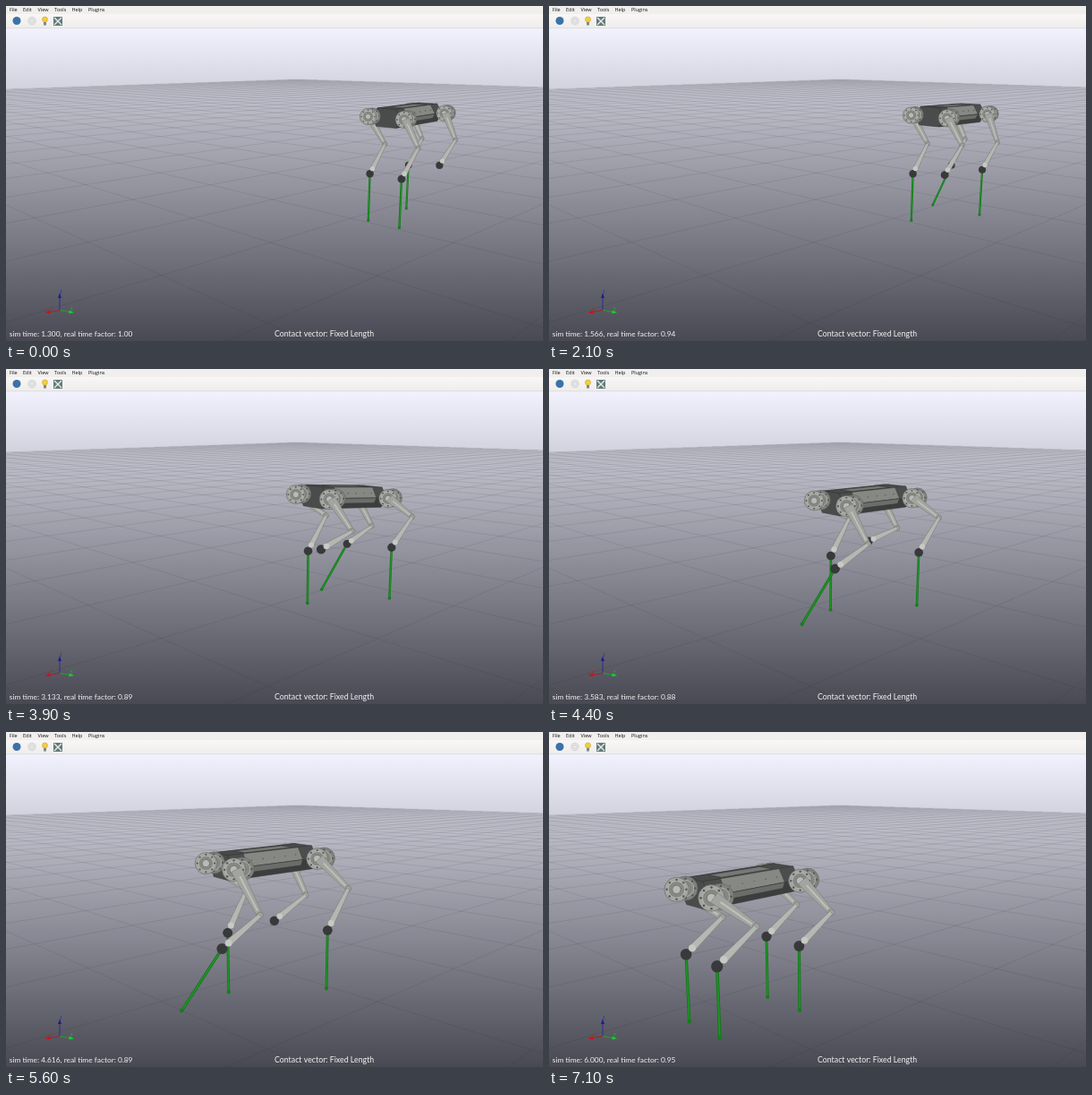
These frames come from a looping animation (600x374 px, 7600 ms). An HTML page with a canvas:

```html
<!DOCTYPE html>
<html lang="en">
<head>
<meta charset="utf-8">
<title>Walking robot viewer</title>
<style>
html, body { margin: 0; height: 100%; overflow: hidden; background: #4d4d59; }
canvas { display: block; }
</style>
</head>
<body>
<canvas id="view" width="600" height="374"></canvas>
<script>
const ctx = document.getElementById('view').getContext('2d');

// Clock: picture step -> simulation ticks (60 per second)
const clock = [[1, 17], [16, 94], [26, 145], [34, 188], [44, 241], [57, 307], [66, 360]];

// Each leg leaves the ground in its own quarter of the gait cycle
const legs = [
  { along: -1, side: 1, beat: 0 },
  { along: 1, side: -1, beat: 1 },
  { along: -1, side: -1, beat: 2 },
  { along: 1, side: 1, beat: 3 }
];
const [hindNear, frontFar, hindFar, frontNear] = legs;
const thigh = .25, shank = .23;

const lerp = (a, b, f) => a + (b - a) * f;
const clamp = (x, lo, hi) => Math.max(lo, Math.min(hi, x));
const mix = (a, b, f) => a.map((v, n) => lerp(v, b[n], f));
const add = (a, b, k = 1) => a.map((v, n) => v + b[n] * k);
const dot = (a, b) => a.reduce((sum, v, n) => sum + v * b[n], 0);
const unit = a => a.map(v => v / Math.hypot(...a));
const bump = (t, mid, width) => Math.exp(-(((t - mid) / width) ** 2));
function ramp(t, from, to) {
  const x = clamp((t - from) / (to - from), 0, 1);
  return x * x * (3 - 2 * x);
}

// Camera: points are [right, ahead, up] in metres
const depth = ([, d, h]) => d * .977 + (.692 - h) * .2095;
function screen(p) {
  const z = depth(p);
  return [300 + 651 * p[0] / z, 199.5 + 651 * ((.692 - p[2]) * .977 - p[1] * .2095) / z];
}
const scaleAt = p => 651 / depth(p);

function line(a, b, color, width) {
  ctx.strokeStyle = color;
  ctx.lineWidth = width;
  ctx.beginPath();
  ctx.moveTo(...a);
  ctx.lineTo(...b);
  ctx.stroke();
}

function poly(points, fill, stroke) {
  ctx.beginPath();
  points.forEach(p => ctx.lineTo(...p));
  ctx.closePath();
  ctx.fillStyle = fill;
  ctx.fill();
  if (stroke) {
    ctx.strokeStyle = stroke;
    ctx.lineWidth = .5;
    ctx.stroke();
  }
}

function disc(p, r, fill, stroke) {
  ctx.beginPath();
  ctx.arc(p[0], p[1], r, 0, 7);
  ctx.fillStyle = fill;
  ctx.fill();
  if (stroke) {
    ctx.strokeStyle = stroke;
    ctx.lineWidth = .6;
    ctx.stroke();
  }
}

function label(text, x, y, font, color) {
  ctx.font = font;
  ctx.fillStyle = color;
  ctx.fillText(text, x, y);
}

// Bar from a to b, w0 and w1 wide at its ends
function taper(a, b, w0, w1, fill) {
  const [dx, dy] = unit([b[0] - a[0], b[1] - a[1]]);
  const side = [-dy / 2, dx / 2];
  poly([add(a, side, w0), add(b, side, w1), add(b, side, -w1), add(a, side, -w0)], fill, '#70726d');
}

// Line between two points of the ground grid, cut just before the camera
function groundLine(x0, y0, x1, y1) {
  const place = (x, y) => [.7 - .711 * x + .703 * y, 3.57 - .703 * x - .711 * y, 0];
  const a = place(x0, y0), b = place(x1, y1), near = .6;
  if (a[1] <= near) return null;
  const cut = b[1] < near ? (a[1] - near) / (a[1] - b[1]) : 1;
  return [screen(a), screen(mix(a, b, cut))];
}

function drawGround() {
  const sky = ctx.createLinearGradient(0, 25, 0, 374);
  sky.addColorStop(0, '#f2f2ff');
  sky.addColorStop(1, '#4d4d59');
  ctx.fillStyle = sky;
  ctx.fillRect(0, 25, 600, 349);

  const half = 12.5;
  const left = groundLine(-half, -half, half, -half);
  const right = groundLine(-half, -half, -half, half);
  poly([left[0], right[1], [1e4, 900], [-1e4, 900], left[1]], 'rgba(30,30,32,.08)');
  for (let c = -half; c <= half; c += .5) {
    for (const ends of [groundLine(c, -half, c, half), groundLine(-half, c, half, c)]) {
      if (ends) line(...ends, 'rgba(30,30,40,.2)', .5);
    }
  }
}

function drawToolbar() {
  const bar = ctx.createLinearGradient(0, 9, 0, 25);
  bar.addColorStop(0, '#f8f7f6');
  bar.addColorStop(1, '#eeedec');
  ctx.fillStyle = '#f0efee';
  ctx.fillRect(0, 0, 600, 9);
  ctx.fillStyle = bar;
  ctx.fillRect(0, 9, 600, 16);
  line([0, 24.7], [600, 24.7], '#d2d1d0', .6);
  const menu = { File: 4, Edit: 19, View: 35.5, Tools: 54, Help: 73.5, Plugins: 92 };
  for (const name in menu) label(name, menu[name], 6, '5.5px "Open Sans", sans-serif', '#111');

  disc([12, 16.5], 4.5, '#3b72a8');
  disc([29, 16.5], 4.3, '#e2e2e1', '#cacaca');
  disc([29, 16.5], 1.6, '#f4f3f2', '#cacaca');
  disc([43.5, 15], 3, '#f3cf3b', '#c9a227');
  ctx.fillStyle = '#858585';
  ctx.fillRect(42, 18, 3, 3.5);
  ctx.fillStyle = '#647a7a';
  ctx.fillRect(53, 12, 10, 10);
  line([54, 13], [62, 21], '#e8eeee', 1.3);
  line([62, 13], [54, 21], '#e8eeee', 1.3);
}

function drawAxes() {
  const o = [60, 339.5], font = '4.5px "Open Sans", sans-serif';
  line(o, [60, 325], '#22229c', .8);
  line(o, [49, 341.6], '#b51616', .8);
  line(o, [71, 341.6], '#16b516', .8);
  poly([[60, 320.5], [62, 326], [58, 326]], '#1c1c98');
  poly([[43.5, 342.3], [48.8, 339.6], [49.4, 343.4]], '#d01212');
  poly([[76, 342.3], [70.8, 339.6], [70.4, 343.4]], '#12d42a');
  label('Z', 60, 320.5, font, '#2a2a90');
  label('X', 48.5, 339.5, font, '#c02020');
  label('Y', 72, 339.5, font, '#20c030');
}

// Body frame: stands, rears up as it sets off, veers while walking, sinks at the stop
function bodyAt(t) {
  const walked = clamp(t - 1.57, 0, 3.98);
  const yaw = (45.5 + 3.4 * walked - 12.5 * ramp(t, 5.2, 5.9)) * Math.PI / 180;
  const pitch = (12.5 * bump(t, 2.5, .75) - 2) * Math.PI / 180;
  const height = .33 + .03 * Math.cos((t - 1.5) * 2 * Math.PI / 3.6) - .045 * ramp(t, 5.4, 5.9);
  const center = [.826 - .287 * walked, 3.62 - .302 * walked, height];
  const heading = [-Math.sin(yaw), -Math.cos(yaw), 0];
  const sideways = [Math.cos(yaw), -Math.sin(yaw), 0];
  const forward = [heading[0] * Math.cos(pitch), heading[1] * Math.cos(pitch), Math.sin(pitch)];
  const up = [-heading[0] * Math.sin(pitch), -heading[1] * Math.sin(pitch), Math.cos(pitch)];
  const at = (a, s, u) => add(add(add(center, forward, a), sideways, s), up, u);
  return { center, heading, sideways, at };
}

function kneeOf(hip, foot, heading) {
  const reach = add(foot, hip, -1), dir = unit(reach);
  const len = Math.min(Math.hypot(...reach), thigh + shank - .005);
  const a = (thigh ** 2 - shank ** 2 + len ** 2) / (2 * len);
  const back = unit(add(dir.map(v => v * dot(heading, dir)), heading, -1));
  return add(add(hip, dir, a), back, Math.sqrt(Math.max(0, thigh ** 2 - a * a)));
}

// Diagonal pairs swing against each other; the partner of a lifted foot pushes at a slant
function poseLeg(leg, body, t) {
  const phase = ((t - 1.3) / .51 + .237 + 10) % 1;
  const quarter = Math.floor(phase * 4);
  const stepping = 1 - ramp(t, 5.4, 5.9);
  const pair = leg.beat < 2 ? -1 : 1;
  const stride = .08 * pair * ramp(t, 1.57, 2) * stepping * Math.cos(2 * Math.PI * (phase - .72));
  const air = quarter === leg.beat && stepping > 0;
  const lift = air ? .07 * stepping * Math.sqrt(Math.sin(Math.PI * (phase * 4 - quarter))) : 0;
  const ground = [body.center[0], body.center[1], lift];
  const foot = add(add(ground, body.heading, leg.along * .215 + stride), body.sideways, leg.side * .115);
  const hip = body.at(leg.along * .225, leg.side * .1275, 0);
  const push = (quarter ^ 1) === leg.beat ? stepping * ramp(t, 1.3, 1.55) : 0;
  const force = add([0, 0, lerp(-.3, -.24, push)], body.heading, .2 * push);
  return { hip, foot, knee: kneeOf(hip, foot, body.heading), force, air };
}

function drawForce({ foot, force, air }) {
  if (air) return;
  const s = scaleAt(foot), a = screen(foot), b = screen(add(foot, force));
  line(a, b, '#14741a', s * .0125);
  line(a, b, '#1f9527', s * .006);
  disc(b, s * .009, '#167d1d');
}

function drawLeg({ hip, knee, foot }) {
  const s = scaleAt(foot);
  const [h, k, f] = [hip, knee, foot].map(screen);
  const ankle = mix(f, k, .17);
  taper(h, k, s * .048, s * .024, '#a2a49f');
  line(mix(h, k, .15), mix(h, k, .9), '#bfc0bb', s * .008);
  disc(k, s * .014, '#a2a49f', '#70726d');
  disc(f, s * .0235, '#38393a');
  taper(k, ankle, s * .017, s * .03, '#b6b7b2');
  disc(ankle, s * .015, '#c8c9c4');
}

function drawHub({ hip }, { heading }) {
  for (const shift of [-.03, .012]) {
    const p = add(hip, heading, shift), r = scaleAt(p) * .05, c = screen(p);
    disc(c, r, shift < 0 ? '#80827e' : '#a4a6a1', '#60625f');
    disc(c, r * .68, '#868883', '#c9cac5');
    for (let a = 0; a < 6.2; a += Math.PI / 4) {
      disc([c[0] + Math.cos(a) * r * .8, c[1] + Math.sin(a) * r * .8], r * .09, '#555755');
    }
    disc(c, r * .34, '#b9bab5', '#5c5e5b');
  }
}

function drawBody({ at }) {
  const face = (len, s0, u0, s1, u1, fill) => poly(
    [at(len, s0, u0), at(-len, s0, u0), at(-len, s1, u1), at(len, s1, u1)].map(screen), fill, '#343636');
  face(.23, -.1, .01, -.065, .055, '#3a3c3c');
  face(.23, -.065, .055, .065, .055, '#484a4a');
  face(.13, -.045, .055, .045, .055, '#777975');
  face(.23, .065, .055, .1, 0, '#4c4e4d');
  face(.15, .065, .055, .1, 0, '#868883');
  face(.23, .1, 0, .07, -.055, '#3c3e3e');
  face(.15, .1, 0, .085, -.028, '#6b6d6a');
  const front = [[-.065, .055], [.065, .055], [.1, 0], [.07, -.055], [-.07, -.055], [-.1, 0]];
  poly(front.map(([s, u]) => screen(at(.23, s, u))), '#4a4c4b', '#343636');
  for (let a = -.12; a < .13; a += .06) disc(screen(at(a, .085, .025)), .7, '#555755');
}

function drawRobot(t) {
  const body = bodyAt(t);
  const posed = new Map(legs.map(leg => [leg, poseLeg(leg, body, t)]));
  const leg = name => drawLeg(posed.get(name));
  const hub = name => drawHub(posed.get(name), body);
  posed.forEach(drawForce);
  leg(hindFar);
  hub(hindFar);
  leg(frontFar);
  drawBody(body);
  hub(frontFar);
  hub(hindNear);
  leg(hindNear);
  hub(frontNear);
  leg(frontNear);
}

function drawStatus(ticks) {
  const t = ticks / 60;
  const time = (Math.floor(ticks * 1000 / 60) / 1000).toFixed(3);
  const load = .12 * ramp(t, 1.3, 1.8) - .063 * ramp(t, 5.4, 6);
  const factor = 1 - load - .01 * Math.cos((t - 2.417) * 2 * Math.PI / 1.5);
  label(`sim time: ${time}, real time factor: ${factor.toFixed(2)}`, 3.8, 368.5, '8.4px Lato, sans-serif', '#f2f2f2');
  label('Contact vector: Fixed Length', 300, 368.5, '8.8px Lato, sans-serif', '#f2f2f2');
}

function ticksAt(ms) {
  if (ms < 600) return 78;
  const step = Math.min(66, Math.floor((ms - 500) / 100));
  const next = Math.max(1, clock.findIndex(([s]) => s >= step));
  const [s0, t0] = clock[next - 1], [s1, t1] = clock[next];
  return Math.round(lerp(t0, t1, (step - s0) / (s1 - s0)));
}

function frame() {
  const ticks = ticksAt(performance.now() % 7600);
  drawGround();
  drawRobot(ticks / 60);
  drawAxes();
  drawStatus(ticks);
  drawToolbar();
  requestAnimationFrame(frame);
}
frame();
</script>
</body>
</html>
```
